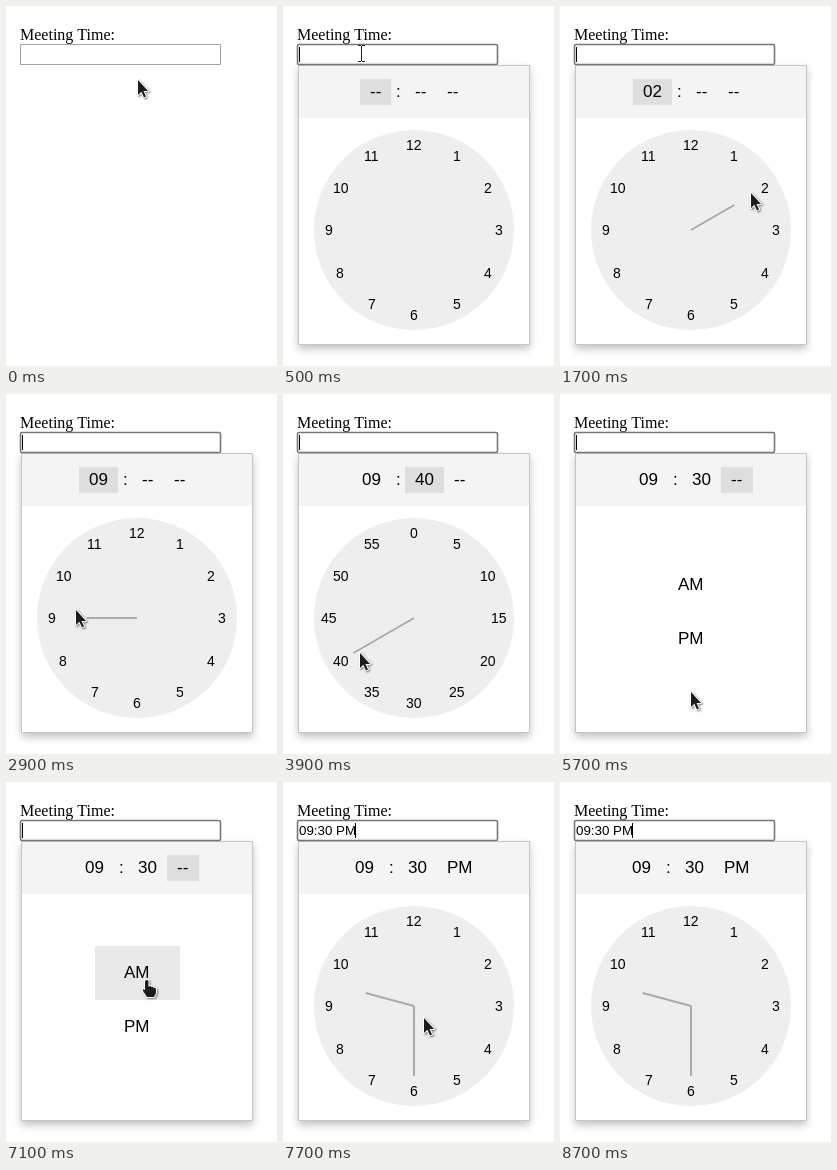
Animation of 271 by 360 pixels, one loop 9300 ms. Source, as an HTML page with a canvas:

```html
<!DOCTYPE html>
<html lang="en">
<head>
<meta charset="utf-8">
<title>Time picker</title>
<style>
html, body { margin: 0; width: 100%; height: 100%; overflow: hidden; background: #fff; }
canvas { display: block; }
</style>
</head>
<body>
<canvas width="271" height="360"></canvas>
<script>
const ctx = document.querySelector('canvas').getContext('2d');
const LOOP = 9300, STEP = 100, BLINK = 500;
const CX = 131, CY = 224, RADIUS = 100;
const SANS = '"Liberation Sans", Arial, sans-serif';
const SERIF = '"Liberation Serif", "Times New Roman", serif';

// Pointer gestures; "via" bends the way into a quadratic curve
const START = [131, 73];
const GESTURES = [
  { from: 0, until: 300, to: [78, 47] },
  { from: 900, until: 1700, to: [190, 186] },
  { from: 1700, until: 2900, to: [69, 215], via: [220, 312] },
  { from: 3600, until: 4300, to: [124, 289], via: [62, 275] },
  { from: 4400, until: 4700, to: [127, 297], via: [150, 295] },
  { from: 5100, until: 5400, to: [130, 297] },
  { from: 6000, until: 6900, to: [141, 198] },
  { from: 7100, until: 7500, to: [140, 235] },
  { from: 8400, until: 8600, to: [207, 234] }
];

const mix = (a, b, p) => a + (b - a) * p;
const pad = n => String(n).padStart(2, '0');

function pointerAt(t) {
  let pos = START;
  for (const { from, until, to, via } of GESTURES) {
    if (t <= from) break;
    const p = Math.min(1, (t - from) / (until - from));
    pos = pos.map((a, i) => via
      ? mix(mix(a, via[i], p), mix(via[i], to[i], p), p)
      : mix(a, to[i], p));
  }
  return pos.map(Math.round);
}

// Clockwise share of a full turn, starting at twelve o'clock
function turnOf([x, y]) {
  return (Math.atan2(x - CX, CY - y) / (2 * Math.PI) + 1) % 1;
}

function rect(x, y, w, h, color) {
  ctx.fillStyle = color;
  ctx.fillRect(x, y, w, h);
}

function frame(x, y, w, h, color, line = 1, radius = 0) {
  ctx.strokeStyle = color;
  ctx.lineWidth = line;
  ctx.beginPath();
  ctx.roundRect(x + 0.5, y + 0.5, w - 1, h - 1, radius);
  ctx.stroke();
}

function text(str, x, y, size, family = SANS, centered = false) {
  ctx.font = `${size}px ${family}`;
  ctx.fillStyle = '#000';
  const left = centered ? x - ctx.measureText(str).width / 2 : x;
  ctx.fillText(str, Math.round(left), Math.round(y));
}

function drawField(open, value, caret) {
  text('Meeting Time:', 14, 34, 16, SERIF);
  if (open) frame(14, 38, 201, 21, '#777', 1.6, 1.5);
  else frame(14, 38, 201, 21, '#a0a0a0');
  text(value, 16, 53, 13.33);
  if (caret) rect(value ? 72 : 16, 41, 1, 15, '#000');
}

function drawPanel() {
  ctx.save();
  ctx.shadowColor = 'rgba(0,0,0,.24)';
  ctx.shadowBlur = 8;
  ctx.shadowOffsetY = 4;
  rect(15, 59, 232, 280, '#fff');
  ctx.restore();
  rect(16, 60, 230, 52, '#f4f4f4');
  frame(15, 59, 232, 280, '#c4c4c4');
}

function drawHeader(parts, active) {
  const size = 17, inset = 10, space = size * 0.278;
  ctx.font = `${size}px ${SANS}`;
  const widths = parts.map(p => ctx.measureText(p).width + inset * 2);
  let x = CX - (widths[0] + widths[1] + widths[2] + space * 3) / 2;
  parts.forEach((part, i) => {
    if (i === active) {
      const left = Math.round(x);
      rect(left, 73, Math.round(x + widths[i]) - left, 26, '#dedede');
    }
    text(part, x + inset, 91, size);
    x += widths[i];
    if (i === 0) {
      text(':', x + space, 91, size);
      x += space * 3;
    }
  });
}

function drawHand(turn, length) {
  const a = turn * 2 * Math.PI;
  ctx.strokeStyle = '#aaa';
  ctx.lineWidth = 2;
  ctx.beginPath();
  ctx.moveTo(CX, CY);
  ctx.lineTo(CX + length * Math.sin(a), CY - length * Math.cos(a));
  ctx.stroke();
}

function drawDial(minutes) {
  ctx.fillStyle = '#eee';
  ctx.beginPath();
  ctx.arc(CX, CY, RADIUS, 0, 2 * Math.PI);
  ctx.fill();
  for (let i = 0; i < 12; i++) {
    const a = i * Math.PI / 6;
    const label = minutes ? i * 5 : i || 12;
    text(label, CX + 85 * Math.sin(a), CY + 5 - 85 * Math.cos(a), 14, SANS, true);
  }
}

function drawPeriods(hovered) {
  ['AM', 'PM'].forEach((name, i) => {
    const y = 164 + i * 54;
    if (i === hovered) rect(89, y, 85, 54, '#e9e9e9');
    text(name, CX, y + 32, 17, SANS, true);
  });
}

const ARROW = new Path2D('M1 1V16L4.4 12.8 7 18.4 9 17.5 6.5 12H11Z');
const FINGER = new Path2D('M-2 1Q0-1 1.5 1V7Q3 5 4.5 7 6 6 7 8 9 7 9 10V13L7 17H0L-4 11Q-5 8-2 10Z');

function drawPointer(shape, [x, y]) {
  ctx.save();
  ctx.translate(x, y);
  if (shape === 'beam') {
    rect(0, -7, 1, 15, '#222');
    for (const end of [-8, 8]) {
      rect(-3, end, 3, 1, '#222');
      rect(1, end, 3, 1, '#222');
    }
  } else {
    const path = shape === 'finger' ? FINGER : ARROW;
    ctx.lineJoin = 'round';
    ctx.lineWidth = 2;
    ctx.strokeStyle = '#fff';
    ctx.shadowColor = 'rgba(0,0,0,.5)';
    ctx.shadowBlur = 2;
    ctx.shadowOffsetX = ctx.shadowOffsetY = 1;
    ctx.stroke(path);
    ctx.shadowColor = 'transparent';
    ctx.fillStyle = '#1c1c1c';
    ctx.fill(path);
  }
  ctx.restore();
}

function draw(t) {
  const open = t >= 500, done = t >= 7700;
  const pos = pointerAt(t);
  const turn = turnOf(pos);
  let shape = 'arrow';

  rect(0, 0, 271, 360, '#fff');
  if (open) drawPanel();
  const blinking = [1000, 6600].some(start => t >= start && t < start + BLINK);
  drawField(open, done ? '09:30 PM' : '', open && !blinking);

  if (done) {
    drawHeader(['09', '30', 'PM'], -1);
    drawDial(false);
    drawHand(9.5 / 12, 50);
    drawHand(0.5, 70);
  } else if (t >= 5700) {
    const hovered = pos[1] >= 272 ? -1 : pos[1] >= 218 ? 1 : 0;
    if (hovered >= 0) shape = 'finger';
    drawHeader(['09', '30', '--'], 2);
    drawPeriods(hovered);
  } else if (t >= 3300) {
    const picked = t >= 3700;
    const minute = Math.round(turn * 60) % 60;
    drawHeader(['09', picked ? pad(minute) : '--', '--'], 1);
    drawDial(true);
    if (picked) drawHand(minute / 60, 70);
  } else if (open) {
    const picked = Math.hypot(pos[0] - CX, pos[1] - CY) < RADIUS;
    const hour = Math.round(turn * 12) % 12 || 12;
    drawHeader([picked ? pad(hour) : '--', '--', '--'], 0);
    drawDial(false);
    if (picked) drawHand(hour / 12, 50);
  }

  if (pos[1] > 38 && pos[1] < 59) shape = 'beam';
  if (t < 8700) drawPointer(shape, pos);
}

function tick() {
  const t = performance.now() % LOOP;
  draw(Math.floor(t / STEP) * STEP);
  requestAnimationFrame(tick);
}
tick();
</script>
</body>
</html>
```
